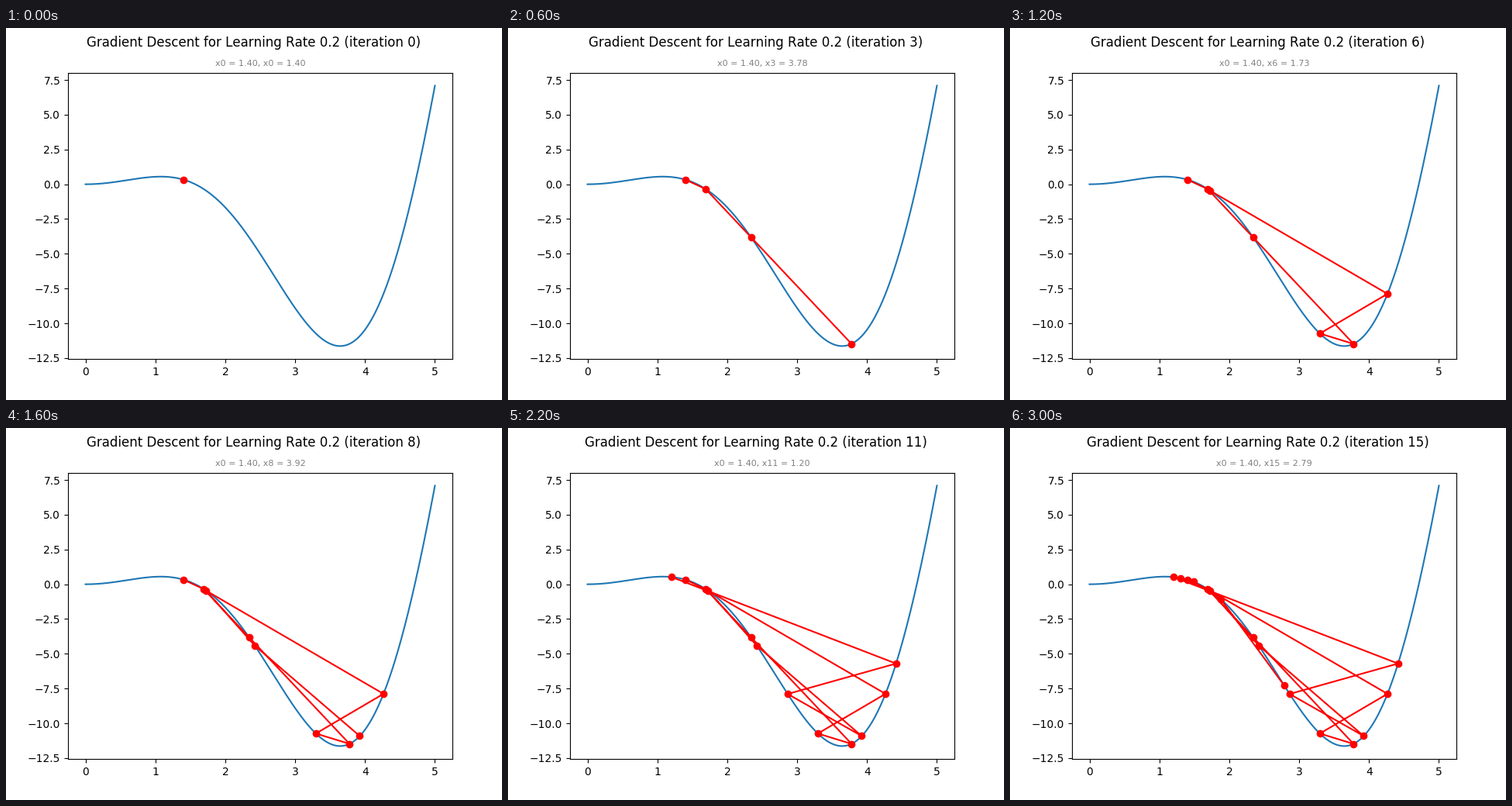
A matplotlib script that plays this animation: 640x480 px, repeating every 3200 ms.

```python
import numpy as np
import matplotlib.pyplot as plt
from matplotlib.animation import FuncAnimation

RATE = 0.2
START = 1.4
STEPS = 16

# Whole-pixel kerning, as in classic text layout
plt.rcParams["text.kerning_factor"] = 6


def f(x):
    return x**2 * np.cos(x)


def slope(x):
    return 2 * x * np.cos(x) - x**2 * np.sin(x)


def descend(x, count):
    path = [x]
    while len(path) < count:
        path.append(path[-1] - RATE * slope(path[-1]))
    return np.array(path)


path = descend(START, STEPS)

fig, ax = plt.subplots(figsize=(6.4, 4.8), dpi=100)
xs = np.linspace(0, 5, 500)
ax.plot(xs, f(xs))
trail, = ax.plot([], [], "ro-")
heading = fig.suptitle("")
note = ax.set_title("", fontsize=8, color="gray")


def update(i):
    seen = path[:i + 1]
    trail.set_data(seen, f(seen))
    heading.set_text(f"Gradient Descent for Learning Rate {RATE} (iteration {i})")
    note.set_text(f"x0 = {path[0]:.2f}, x{i} = {path[i]:.2f}")
    return trail, heading, note


anim = FuncAnimation(fig, update, frames=STEPS, interval=200, repeat=True)
plt.show()
```
